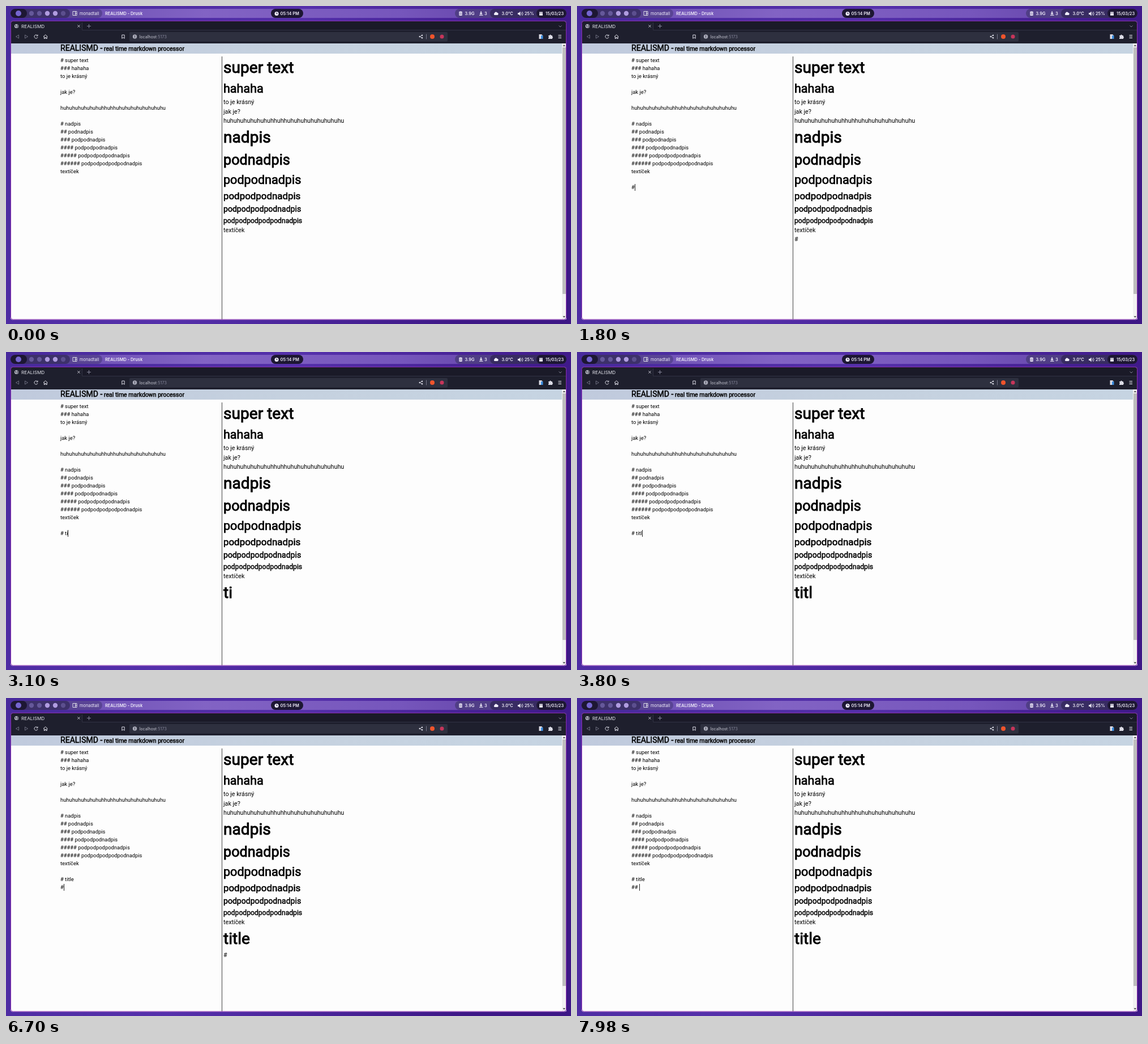
An HTML page that plays this animation: 998x561 px, repeating every 8000 ms.

```html
<!DOCTYPE html>
<html lang="en">
<head>
<meta charset="utf-8">
<title>Live markdown editor</title>
<style>
  html, body { margin: 0; width: 100%; height: 100%; overflow: hidden; }
  body { position: relative; font-family: Roboto, sans-serif; color: #000; }
  svg { position: absolute; left: 0; top: 0; }
  .ui { font: 600 7.4px Inter, sans-serif; fill: #f0edfa; }
  .line { fill: none; stroke: #dcdce6; stroke-width: 1; }
  .bold, h1, h2, h3, h4, h5, h6 { font-weight: 400; -webkit-text-stroke: .034em #000; }
  #brand, #editor, #preview { position: absolute; white-space: pre; }
  #brand { left: 96px; top: 66px; height: 18px; line-height: 17px; font-size: 14.05px; }
  #brand small { font-size: 10.5px; }
  #editor { left: 96px; top: 89px; font-size: 9.38px; line-height: 14px; }
  #editor div { height: 14px; }
  #editor i { display: inline-block; width: 1px; height: 12px; margin-right: -1px; background: #222; vertical-align: -3px; }
  #preview { left: 384px; top: 88px; line-height: 1.5; }
  #preview > * { margin: 0; }
  p { font-size: 10.75px; }
  h1 { font-size: 28.1px; }
  h2 { font-size: 25.2px; }
  h3 { font-size: 21.55px; }
  h4 { font-size: 16.9px; }
  h5 { font-size: 14.05px; }
  h6 { font-size: 12.15px; }
</style>
</head>
<body>
<svg width="998" height="561" viewBox="0 0 998 561">
  <defs>
    <linearGradient id="wall" x2="1" y2=".25">
      <stop stop-color="#482a9c"/><stop offset=".5" stop-color="#5530ab"/><stop offset="1" stop-color="#3d1786"/>
    </linearGradient>
    <linearGradient id="bar">
      <stop stop-color="#6549ad"/><stop offset=".35" stop-color="#8263c4"/>
      <stop offset=".7" stop-color="#7656bc"/><stop offset="1" stop-color="#5a3b9e"/>
    </linearGradient>
    <linearGradient id="head">
      <stop stop-color="#c0cadd"/><stop offset=".5" stop-color="#c5d1df"/><stop offset="1" stop-color="#c6d4e2"/>
    </linearGradient>
  </defs>
  <rect width="998" height="561" fill="url(#wall)"/>

  <!-- desktop bar -->
  <rect x="8" y="5" width="982" height="16" rx="8" fill="url(#bar)"/>
  <rect x="30" y="5" width="140" height="16" rx="8" fill="#594494"/>
  <rect x="20" y="5" width="93" height="16" rx="8" fill="#3d316a"/>
  <rect x="8" y="5" width="29" height="16" rx="8" fill="#1d1733"/>
  <circle cx="22" cy="13" r="5" fill="#7566d0"/>
  <g id="dots"></g>
  <path class="line" d="M118 9.5h7v7h-7zM122.5 9.5v7M122.5 13h3"/>
  <rect x="468" y="5" width="57" height="16" rx="8" fill="#1d1733"/>
  <circle cx="478" cy="13.5" r="3.5" fill="#f0edfa"/>
  <path d="M478 11.3v2.4h1.7" fill="none" stroke="#1d1733"/>
  <rect x="793" y="5" width="90" height="16" rx="8" fill="#503e86"/>
  <rect x="855" y="5" width="110" height="16" rx="8" fill="#382c62"/>
  <rect x="937" y="5" width="53" height="16" rx="8" fill="#1d1733"/>
  <g fill="#f0edfa">
    <path d="M800 10.5q3-2 6 0v1.3h-6zM800 12.4h6v1.7h-6zM800 14.7h6v1.5q-3 1.6-6 0z"/>
    <path d="M838.3 9.5h1.6v3h2l-2.8 2.7-2.8-2.7h2zM836 15.4h6.5v1.4H836z"/>
    <path d="M863 16a2 2 0 0 1 0-3.6a2.5 2.5 0 0 1 4.6-.6a2.2 2.2 0 0 1 .8 4.2z"/>
    <path d="M904 12h2l2.5-2.4v7.8l-2.5-2.4h-2z"/>
    <path d="M942 10.5h6v1.4h-6zM942 12.5h6v4.3h-6z"/>
  </g>
  <path class="line" d="M910 11.5q1.5 2 0 4M911.7 10q3 3.5 0 7"/>
  <g class="ui">
    <text x="130" y="16.2" font-weight="400">monadtall</text>
    <text x="175" y="16.2">REALISMD - Drusk</text>
    <text x="484.5" y="16.2">05:14 PM</text>
    <text x="810.5" y="16.2">3.9G</text>
    <text x="845" y="16.2">3</text>
    <text x="875.5" y="16.2">3.0°C</text>
    <text x="916" y="16.2">25%</text>
    <text x="953" y="16.2">15/03/23</text>
  </g>

  <!-- browser window -->
  <rect x="8" y="26.5" width="982" height="527" rx="4" fill="#fdfdfd"/>
  <path d="M8 66V30.500q0-4 4-4h974q4 0 4 4V66z" fill="#1a1a28"/>
  <path d="M10 43V31q0-3 3-3h118q3 0 3 3v12h856v23H8V43z" fill="#1e1f2d"/>
  <path d="M134.500 29v13.500H990" fill="none" stroke="#323344"/>
  <rect x="218" y="46" width="562" height="16.500" rx="2" fill="#2e303f"/>
  <circle cx="18.500" cy="35.500" r="3.600" fill="#b9bac6"/>
  <path d="M16 34l2 1-1 2M20 33l1 3-2 2" fill="none" stroke="#1e1f2d"/>
  <text x="27" y="38.500" font-family="Inter, sans-serif" font-size="8.200" fill="#e4e4ec">REALISMD</text>
  <g class="line">
    <path d="M126.500 33.500l4 4M130.500 33.500l-4 4"/>
    <path d="M143 35.500h7M146.500 32v7M976.500 34.500l2.500 2.500 2.500-2.500" stroke="#85869a"/>
    <path d="M22.500 51l-5 3 5 3zM33.500 51l5 3-5 3z" stroke="#6b6c7d"/>
    <path d="M55.600 52.200a3.100 3.100 0 1 0 .4 2.800M56 50.500v2.300h-2.400"/>
    <path d="M66 54l3.700-3.300 3.700 3.300M67.300 53.500v4h1.500v-2h2v2h1.500v-4"/>
    <path d="M204.800 51h4.400v6.300l-2.200-1.800-2.200 1.800z"/>
    <path d="M735 51.700l-4.300 2.300 4.300 2.300" stroke-width=".8"/>
    <path d="M742.500 49.500v9" stroke="#77788a"/>
    <path d="M975.500 51.500h5.500M975.500 54h5.500M975.500 56.500h5.500"/>
  </g>
  <g fill="#dcdce6">
    <circle cx="735" cy="51.700" r="1.200"/><circle cx="730.700" cy="54" r="1.200"/><circle cx="735" cy="56.300" r="1.200"/>
    <path d="M958 52h2a1.500 1.500 0 0 1 3 0h2v2a1.400 1.400 0 0 1 0 2.700v1.300h-7v-2a1.300 1.300 0 0 0 0-2.500z"/>
    <path d="M941.500 50h4.500l2 2v6h-6.500z"/>
  </g>
  <path d="M945 52h3.500v6H945z" fill="#3c8ee0"/>
  <circle cx="227.500" cy="54" r="3.700" fill="#a9aab8"/>
  <path d="M227.500 52v2.500M227.500 55.300v1" stroke="#2e303f"/>
  <text x="235.500" y="56.700" font-family="Inter, sans-serif" font-size="7.200" fill="#c8c8d4">localhost<tspan fill="#85869a">:5173</tspan></text>
  <circle cx="753" cy="54" r="4" fill="#f0542c"/>
  <circle cx="770" cy="54" r="3.500" fill="#c7355a"/>

  <!-- page -->
  <rect x="8.500" y="66" width="973.500" height="18" fill="url(#head)"/>
  <path d="M381.500 89v464" stroke="#444"/>
  <path d="M982 66h7.500v487H982z" fill="#f1f1f1"/>
  <path d="M983 73h6v435h-6z" fill="#bdbdbd"/>
  <path d="M983.500 71l2.300-3 2.300 3zM983.500 547l2.300 3 2.300-3z" fill="#555"/>
  <rect x="8.500" y="26.500" width="981" height="526.500" rx="4" fill="none" stroke="#8a2fb0"/>
</svg>
<div id="brand" class="bold">REALISMD -<small> real time markdown processor</small></div>
<div id="editor"></div>
<div id="preview"></div>
<script>
const LOOP = 8000;
const pod = n => 'pod'.repeat(n) + 'nadpis';
const laugh = 'hu'.repeat(7) + 'hhuh' + 'hu'.repeat(9);
const base = ['# super text', '### hahaha', 'to je krásný', '', 'jak je?', '', laugh, '',
  ...Array.from({ length: 6 }, (_, i) => '#'.repeat(i + 1) + ' ' + pod(i)), 'textíček', ''];

// [time, text typed so far]; null means the editor has no focus
const steps = [
  [0, null], [1000, ''], [1400, '#'], [2100, '# '], [2800, '# t'], [3100, '# ti'],
  [3800, '# titl'], [3900, '# title'], [4200, '# title\n'],
  [6300, '# title\n#'], [7000, '# title\n##'], [7700, '# title\n## ']
];

const $ = id => document.getElementById(id);
function add(parent, tag, text = '') {
  const el = document.createElement(tag);
  el.textContent = text;
  parent.append(el);
  return el;
}

function render(typed) {
  const focused = typed !== null;
  const lines = focused ? base.concat(typed.split('\n')) : base;
  $('editor').replaceChildren();
  $('preview').replaceChildren();
  for (const line of lines) {
    add($('editor'), 'div', line);
    const head = /^(#{1,6}) (.*)$/.exec(line);
    if (head) add($('preview'), 'h' + head[1].length, head[2]);
    else if (line) add($('preview'), 'p', line);
  }
  if (focused) add($('editor').lastChild, 'i');
}

['#65589a', '#65589a', '#b09ce0', '#b09ce0', '#5c4f8e'].forEach((fill, i) => {
  const dot = document.createElementNS('http://www.w3.org/2000/svg', 'circle');
  for (const [k, v] of Object.entries({ cx: 45 + 14 * i, cy: 13, r: 4.2, fill })) dot.setAttribute(k, v);
  $('dots').append(dot);
});

let shown = null;
const start = performance.now();
function tick() {
  const t = (performance.now() - start) % LOOP;
  const step = steps.findLast(s => s[0] <= t);
  if (step !== shown) {
    shown = step;
    render(step[1]);
  }
  requestAnimationFrame(tick);
}
tick();
</script>
</body>
</html>
```
